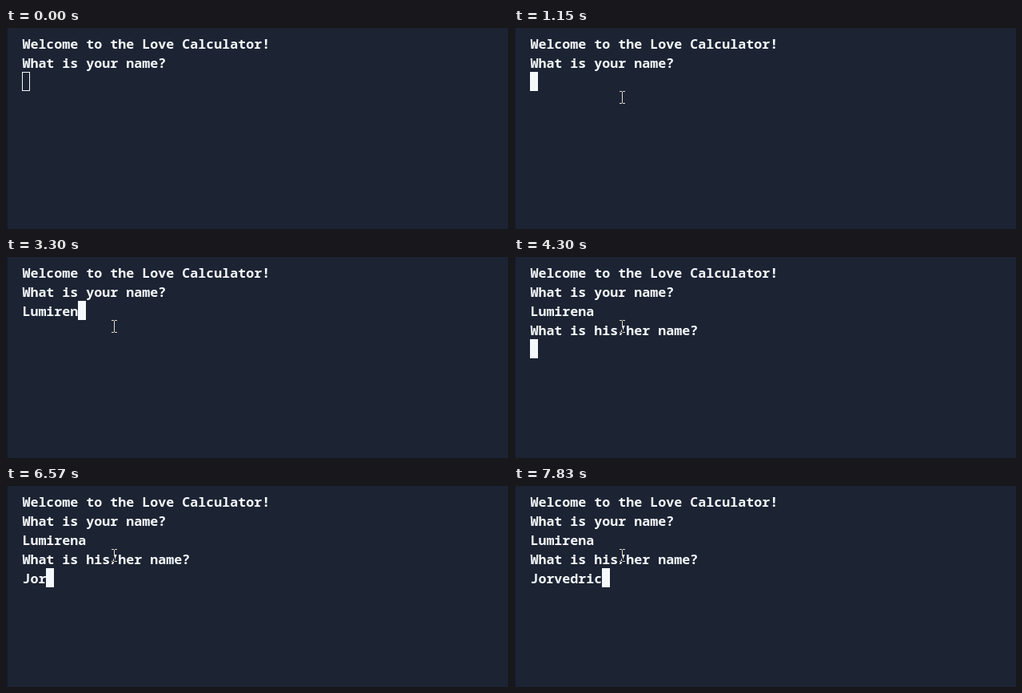
Write an HTML page that moves like this. It is 628 px wide and 252 px high and loops after 8 s.

```html
<!DOCTYPE html>
<html lang="en">
<head>
<meta charset="utf-8">
<title>Love Calculator</title>
<style>
  html, body { margin: 0; width: 100%; height: 100%; overflow: hidden; background: #1c2333; }
  svg { display: block; width: 628px; height: 252px; }
  text { font: 600 16.6667px "Noto Sans Mono", "DejaVu Sans Mono", monospace; fill: #f5f9fc; }
  #beam { fill: none; stroke: #fff; mix-blend-mode: difference; }
</style>
</head>
<body>
<svg viewBox="0 0 628 252">
  <rect width="628" height="252" fill="#1c2333"/>
  <rect width="2" height="252" fill="#12192a"/>
  <text x="20.4" y="26">Welcome to the Love Calculator!</text>
  <text x="20.4" y="50">What is your name?</text>
  <text id="first" x="20.4" y="74"></text>
  <text id="ask" x="20.4" y="98">What is his/her name?</text>
  <text id="second" x="20.4" y="122"></text>
  <rect id="block" x=".5" y=".5" width="9" height="23" stroke="#f5f9fc"/>
  <path id="beam" d="M-3 -7.5h3M1 -7.5h3M.5 -7V7M-3 7.5h3M1 7.5h3"/>
</svg>
<script>
const LOOP = 8000, FOCUS = 1150, ENTER = 4300;
const answers = [
  { word: "Lumirena", keys: [1830, 2290, 2360, 2760, 2960, 3230, 3300, 3770] },
  { word: "Jorvedric", keys: [6040, 6240, 6570, 6830, 7090, 7290, 7560, 7630, 7830] }
];
// Pointer stops, one every 70 ms from 200 ms on.
const path = [[495, 234], [378, 192], [226, 163], [155, 131], [143, 106], [139, 96], [136, 89], [135, 87]];

const $ = id => document.getElementById(id);
const [first, second, ask, block, beam] = ["first", "second", "ask", "block", "beam"].map($);

const place = (el, x, y) => el.setAttribute("transform", `translate(${x} ${y})`);
const show = (el, on) => { el.style.display = on ? "" : "none"; };
const typed = ({ word, keys }, t) => word.slice(0, keys.filter(k => k <= t).length);

function pointer(t) {
  if (t >= 950 && t < 1080) return [143, 92]; // small nudge before the click
  return path[Math.min(path.length - 1, Math.floor((t - 200) / 70))];
}

function draw(t) {
  const a = typed(answers[0], t), b = typed(answers[1], t);
  const entered = t >= ENTER, moved = t >= 200;
  first.textContent = a;
  second.textContent = b;
  show(ask, entered);

  place(block, 20 + 10 * (entered ? b : a).length, entered ? 103 : 55);
  block.setAttribute("fill", t >= FOCUS ? "#f5f9fc" : "none");

  show(beam, moved);
  if (moved) place(beam, ...pointer(t));
}

const start = performance.now();
function tick() {
  draw((performance.now() - start) % LOOP);
  requestAnimationFrame(tick);
}
draw(0);
requestAnimationFrame(tick);
</script>
</body>
</html>
```
